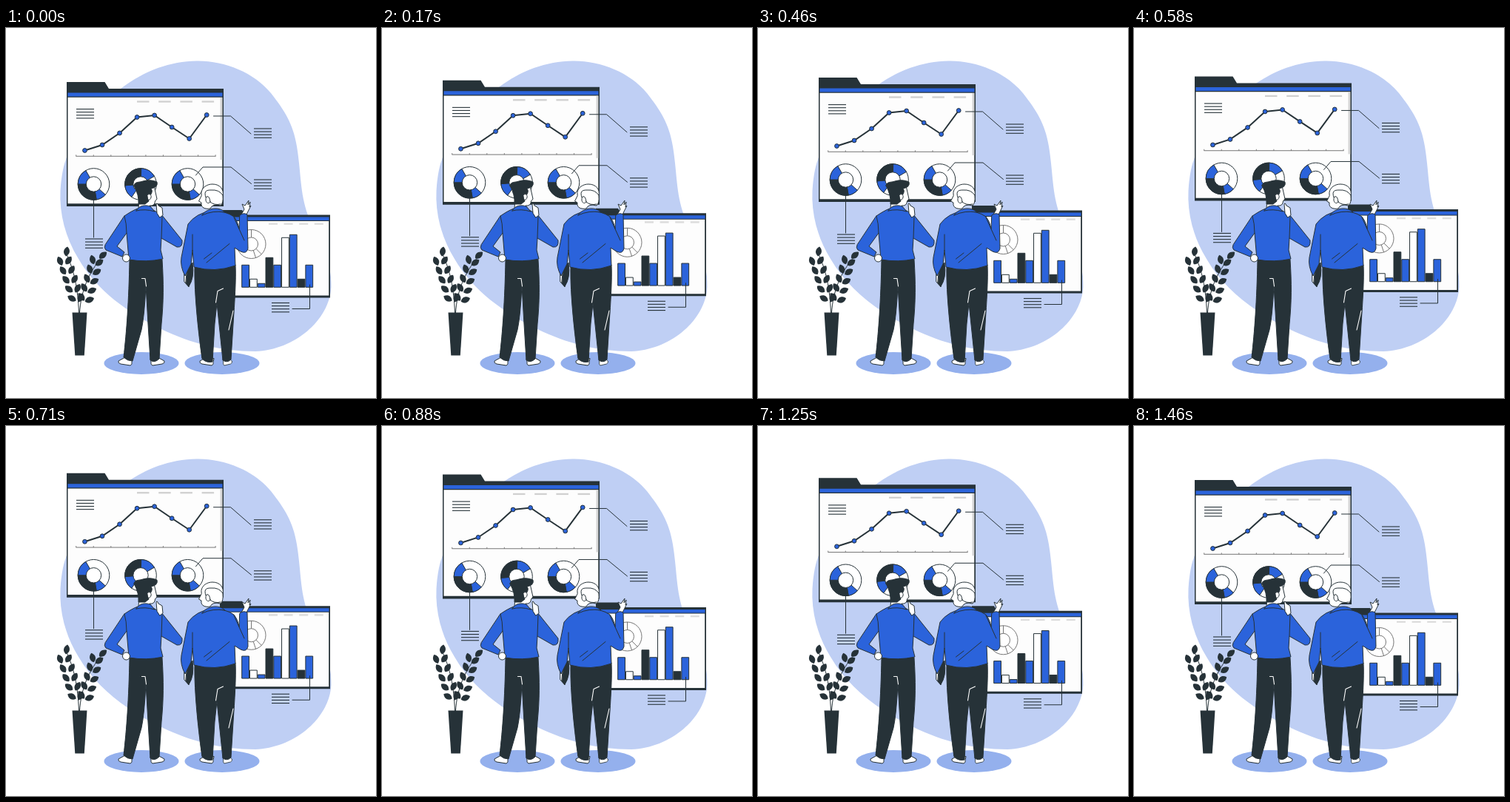
Recreate the animation shown at these times as an HTML page. Size 500 by 500 pixels, loop 1500 ms.

```html
<!DOCTYPE html>
<html lang="en">
<head>
<meta charset="utf-8">
<title>Dashboard review</title>
<style>
html, body { margin: 0; width: 100%; height: 100%; overflow: hidden; background: #fff; }
svg { display: block; width: 100%; height: 100%; }
.ink { fill: #263238; }
.blue { fill: #2b63db; }
.paper { fill: #fff; }
.panel { fill: #fdfdfd; }
.none { fill: none; }
.line { stroke: #263238; stroke-width: 1; stroke-linecap: round; stroke-linejoin: round; }
.seam { fill: none; stroke: #fff; stroke-width: 1.1; }
</style>
</head>
<body>
<svg viewBox="0 0 500 500">
  <defs>
    <path id="shoe" class="paper line" d="M10 0L1 5Q0 8 4 9L17 11Q20 10 19 6L20 2Z"/>
  </defs>

  <path fill="#bfcff4" d="M258 44.5C295 44 335 60 358 88C376 111 388 129 393 160C399 197 397 222 408 253C420 288 441 312 439.5 350C437 395 390 435 337 437C290 437 250 426 210 407C165 385 123 355 98 312C80 283 72 250 73.5 220C75 197 78 185 83 172C100 130 125 101 155 82C188 57 222 45 258 44.5Z"/>

  <g id="boards">
    <path class="ink" d="M82 73H133.5L139 82H294V241H82Z"/>
    <path class="blue" d="M83.5 87.5H292.500V92.500H83.500Z"/>
    <path class="panel" d="M83.5 93.8H292.300V237.300H83.500Z"/>
    <path fill="#d4d4d4" d="M289.5 94H292.300V178H289.500Z"/>
    <path class="ink" d="M289 246H319L323 252.500H438V364.500H289Z"/>
    <path class="blue" d="M290 255.5H436.500V260H290Z"/>
    <path class="panel" d="M290 261H436.200V361.500H290Z"/>
    <g id="charts"></g>
    <path class="none line" d="M280.5 119H303.500L331 143M256.500 199L266 188H304L331.500 210.500M118.500 226V283M410.500 347V379.500H387"/>
  </g>

  <g fill="#94b0ed">
    <ellipse cx="183" cy="453" rx="50.5" ry="15"/>
    <ellipse cx="292" cy="453" rx="50.5" ry="15"/>
  </g>

  <g id="plant" class="ink">
    <path d="M89.5 384.500H109.500L105.800 442.500H93.300Z"/>
    <path class="none line" d="M98.5 385C97 350 92 328 82 306M99.500 385C101 357 111 331 130 309"/>
  </g>

  <g id="younger" class="line">
    <use href="#shoe" x="151" y="445"/>
    <use href="#shoe" transform="translate(215 445) scale(-1 1)"/>
    <path class="ink" d="M167 313H211C213 345 213 370 210 400L207 447Q201 453 195 449L192 400L189 348Q187 390 183 408L171 450Q164 450 159 445C163 410 166 370 167 313Z"/>
    <path class="seam" d="M183.5 338.500H188L189.500 349"/>
    <path class="paper" d="M180 230L179 244L194 246V240Q201 241 201.500 234L204 231L200 213H190Z"/>
    <path class="ink" d="M173 213C174 207 180 209 185 207Q195 204 204 208Q206 215 196 217Q199 221 195 226L191 229L193 234L188 238H179Q180 226 173 213Z"/>
    <path class="paper" d="M191 226C193 223 197 225 196 229Q195 233 192 232Z"/>
    <path class="blue" d="M160 254Q170 247 178 244H195L210 252L238 287Q239 297 231 296L210 284L209 300L212 312Q190 317 166 313L163 277L150 295L160 303L157 309L135 300Q132 297 134 293Z"/>
    <path class="none" d="M160 254Q163 264 163 277M211 255L210 284"/>
    <path class="blue" d="M176 247C180 239 189 239 195 241L201 248Q188 244 176 247Z"/>
    <path class="paper" d="M204 250L203 238Q204 235 206 240L211 243L212 253L208 256Z"/>
    <circle class="paper" cx="162.500" cy="311" r="5"/>
  </g>

  <g id="older" class="line">
    <use href="#shoe" x="261" y="445"/>
    <use href="#shoe" transform="translate(306 445) scale(-.65 1)"/>
    <path class="ink" d="M255 322Q285 330 310 320C311 340 309 370 307 400L304 448Q299 453 293 449L285 372L282 400L279 451Q271 453 265 447C261 420 254 360 255 322Z"/>
    <path class="seam" d="M293.5 352L286 355.500L283.500 371M307 382L301 408"/>
    <path class="paper" d="M241 332L245 326L251 334L247 350L241 343Z"/>
    <path class="ink" d="M245 324L252 317Q255 338 247 349L243 345Z"/>
    <path class="paper" d="M318 252L322 245L319 238L323 240L328 233L327 239L330 235L329 242L331 240L327 248L325 252Z"/>
    <path class="blue" d="M316 253Q321 249 326 252L327 298Q325 306 317 302L309 297L310 321Q282 331 254 323L252 300L250 319L242 335Q235 322 237 310L246 265Q257 250 278 247Q297 247 308 255Q313 261 315 271Z"/>
    <path class="none" d="M252 300V279M308 256L322 287M267.500 312L278 304M271 317L302 291.500"/>
    <path class="blue" d="M265 253C270 244 287 240 296 249Q280 246 265 253Z"/>
    <path class="paper" d="M264 222C265 215 272 211 279 211C289 211 295 218 293 227Q294 236 290 240Q279 237 276 244C269 245 263 243 264 236L260.500 234L264 227Z"/>
    <path class="none" d="M270 229C267 220 271 219 277 219Q288 218 293 226M276 235Q281 240 290 238M276 235C272 240 268 233 271 228Q275 226 276 235"/>
  </g>
</svg>

<script>
const INK = '#263238', BLUE = '#2b63db', WHITE = '#fff', GREY = '#666';
const charts = document.getElementById('charts');
const plant = document.getElementById('plant');
const boards = document.getElementById('boards');

function add(parent, tag, attrs) {
  const el = document.createElementNS('http://www.w3.org/2000/svg', tag);
  for (const key in attrs) el.setAttribute(key, attrs[key]);
  return parent.appendChild(el);
}

function path(d, stroke = INK, width = 1, fill = 'none') {
  add(charts, 'path', { d, stroke, 'stroke-width': width, fill });
}

function circle(cx, cy, r, fill, stroke = INK, width = 1) {
  add(charts, 'circle', { cx, cy, r, fill, stroke, 'stroke-width': width });
}

function polar(cx, cy, r, degrees) {
  const a = degrees * Math.PI / 180;
  return `${cx + r * Math.cos(a)} ${cy + r * Math.sin(a)}`;
}

function textLines(x, y) {
  for (let i = 0; i < 4; i++) path(`M${x} ${y + i * 4.1}h24`, INK, 1.1);
}

function dashes(x, y, step, length, color) {
  for (let i = 0; i < 4; i++) path(`M${x + i * step} ${y}h${length}`, color, 2.3);
}

// Blue, ink and blue slices between consecutive angles; the rest stays white.
function donut(cx, cy, angles) {
  const R = 21.3;
  circle(cx, cy, R, WHITE);
  [BLUE, INK, BLUE].forEach((color, i) => {
    const from = polar(cx, cy, R, angles[i]), to = polar(cx, cy, R, angles[i + 1]);
    path(`M${cx} ${cy}L${from}A${R} ${R} 0 0 1 ${to}Z`, INK, 1, color);
  });
  circle(cx, cy, 10.2, WHITE);
}

function leaf(x, y, tilt) {
  add(plant, 'path', {
    d: 'M0 6.5C-5.5 3-5-3 0-6.5C5-3 5.5 3 0 6.5Z',
    transform: `translate(${x} ${y}) rotate(${tilt})`
  });
}

// Five leaves down one side of a stem, opening wider towards the pot.
function leafRow(x, y, dx, tilt, turn) {
  for (let i = 0; i < 5; i++) leaf(x + i * dx, y + i * 12.6, tilt + i * turn);
}

textLines(95, 109.6);
textLines(335, 136);
textLines(335, 205);
textLines(107, 285);
textLines(359, 371.5);
dashes(177, 99.5, 29.2, 16.5, '#d0d0d0');
dashes(355, 264.7, 20.6, 12, '#dcdcdc');

path('M94.5 173.3H283.5', GREY, 0.9);
for (let i = 0; i < 9; i++) path(`M${94.7 + i * 23.55} 173.3v-2`, GREY, 0.8);

const trend = [165.5, 158, 142, 120.5, 118, 134, 149.5, 117.5].map((y, i) => [106.5 + i * 23.53, y]);
path('M' + trend.join('L'), INK, 2);
trend.forEach(([x, y]) => circle(x, y, 2.9, BLUE));

donut(118.5, 211, [42, 80, 180, 240]);
donut(182, 211, [125, 175, 272, 330]);
donut(245.5, 211, [42, 80, 180, 240]);

circle(331.5, 292, 19.5, WHITE, GREY, 0.9);
circle(331.5, 292, 9, 'none', GREY, 0.9);
for (const angle of [45, 72, 180, 270])
  path(`M${polar(331.5, 292, 9, angle)}L${polar(331.5, 292, 19.5, angle)}`, GREY, 0.9);

const barColors = [BLUE, WHITE, BLUE, INK];
[30, 11, 5, 40, 30, 67, 71, 11, 30].forEach((height, i) =>
  path(`M${318.7 + i * 10.77} 350.3v${-height}h9.8v${height}Z`, INK, 1, barColors[i % 4]));
path('M410.5 347V355');

leaf(82, 302, 10);
leafRow(73, 315, 4, -25, -9);
leafRow(84.5, 314, 4.1, 35, -2);
leaf(131, 307, 50);
leafRow(117, 313, -3.8, -15, -6);
leafRow(126, 317, -3.3, 55, 4);

// The boards rise and sink at constant speed, then rest briefly.
const LOOP = 1500, RISE = 9.5, PEAK = 730;
function frame() {
  const t = performance.now() % LOOP;
  const lift = RISE * Math.max(0, 1 - Math.abs(t - PEAK) / PEAK);
  boards.setAttribute('transform', `translate(0 ${-lift})`);
  requestAnimationFrame(frame);
}
frame();
</script>
</body>
</html>
```
